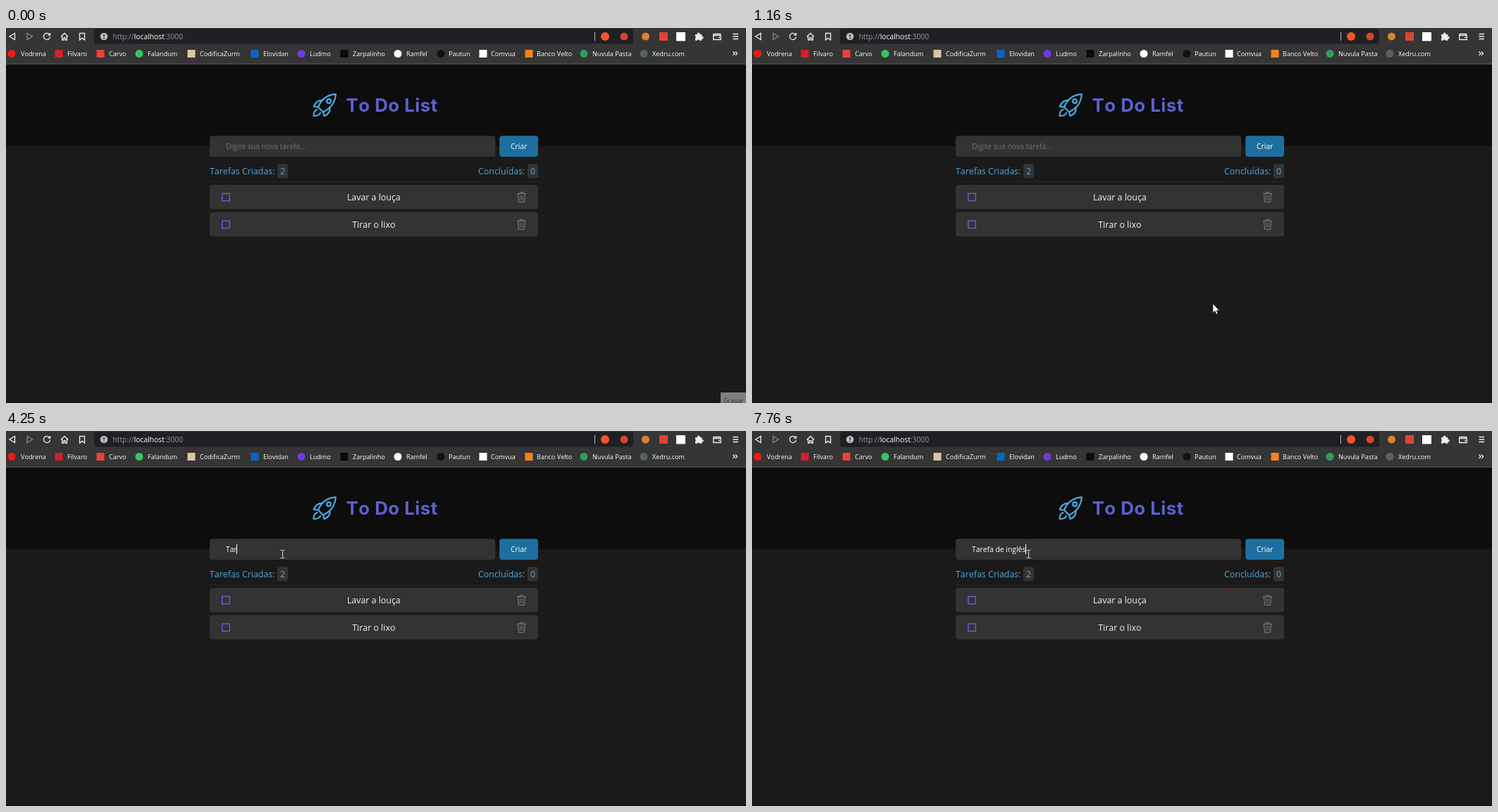
An HTML page for the animation above (8000 ms loop, 1050 px wide and 533 px high).

```html
<!DOCTYPE html>
<html lang="pt-BR">
<head>
<meta charset="utf-8">
<title>To Do List</title>
<style>
html, body { margin: 0; width: 100%; height: 100%; overflow: hidden; background: #1a1a1a; }
svg { display: block; width: 1050px; height: 533px; font-family: "Open Sans", "Noto Sans", sans-serif; }
text { white-space: pre; font-kerning: none; }
.line { fill: none; stroke: #eee; stroke-width: 1.3; }
.page { font-size: 12.4px; }
.small { font-size: 10.36px; }
.blue { fill: #4ea8de; }
.mid { text-anchor: middle; }
</style>
</head>
<body>
<svg viewBox="0 0 1050 533">
  <defs>
    <g id="task">
      <rect x="289" width="466" height="34.5" rx="4" fill="#333"/>
      <rect x="306.75" y="12.25" width="10.5" height="10.5" fill="none" stroke="#5e60ce" stroke-width="1.5"/>
      <g fill="none" stroke="#808080">
        <path d="M725 12.5h13M729 12v-1.5h5v1.5M726.6 13l.8 11.4h8.200l.8-11.400"/>
        <path d="M729.500 15v7M731.500 15v7M733.500 15v7" stroke-width=".7"/>
      </g>
    </g>
  </defs>

  <!-- Browser bars -->
  <rect width="1050" height="51" fill="#353535"/>
  <rect x="125" y="1" width="765" height="21.5" rx="3" fill="#1f2023"/>
  <g class="line">
    <path d="M12.5 7.5v9L5 12z"/>
    <path d="M30 7.5v9L37.5 12z" stroke="#888"/>
    <path d="M61.7 9.2A4.6 4.6 0 1 0 62.6 12.5M62.6 7v3.2h-3.3"/>
    <path d="M78 12.3 83 7.5l5 4.8M79.6 11.3V17h2.3v-3.4h2.2V17h2.3v-5.7"/>
    <path d="M104.5 7.500h7V17l-3.500-2.600-3.500 2.600z"/>
    <path d="M1004 8.5h9.5v2M1003.7 8.2v8.3h10.6v-6h-10M1011 13.5h2"/>
    <path d="M1031.5 8.5h7.5M1031.5 12h7.5M1031.5 15.5h7.5"/>
  </g>
  <circle cx="139" cy="12" r="5.3" fill="#bbb"/>
  <path d="M139 8.7v4M139 14v1.5" stroke="#1f2023" stroke-width="1.4"/>
  <text x="151.5" y="15.5" font-size="10.3" fill="#999">http://<tspan fill="#fff">localhost</tspan>:3000</text>
  <path d="M835.5 6v12" stroke="#bbb"/>
  <circle cx="850" cy="12" r="6" fill="#f4532d"/>
  <circle cx="877" cy="12" r="5.5" fill="#d5442c"/>
  <circle cx="907.5" cy="12" r="5.5" fill="#d9822f"/>
  <rect x="927" y="6" width="12" height="12" fill="#dd4337"/>
  <rect x="951" y="6" width="13" height="12.5" fill="#fff"/>
  <path d="M978 9h3a1.8 1.8 0 1 1 3.4 0h3v3a1.8 1.8 0 1 1 0 3.4v2.3h-3.3a1.7 1.7 0 0 0-3.2 0H978v-3a1.8 1.8 0 0 0 0-3z" fill="#eee"/>
  <g id="bookmarks" font-size="9.1" fill="#fff"></g>
  <path d="M1031.5 33.5l2.5 2.7-2.5 2.7M1035 33.5l2.5 2.7-2.5 2.7" class="line"/>

  <!-- Page -->
  <rect y="51" width="1050" height="116.5" fill="#0d0d0d"/>
  <rect y="50" width="1050" height="2" fill="#454545"/>
  <rect y="532" width="1050" height="1" fill="#0d0d0d"/>
  <g fill="none" stroke="#4ea8de" stroke-width="2.2" stroke-linejoin="round" stroke-linecap="round">
    <path d="M443 112.5C447 102 454 95 467.8 94.2C467 107.5 460 114.5 450 119.5z"/>
    <path d="M449 103C443 102.500 439 106 436.600 111.500L443 112.500M459.500 113.500C460 119 457 123 451.500 125L450 119.500"/>
    <path d="M441.500 116C437.500 117 436.500 121 436.500 125C441 125 445 124.500 446 120.500"/>
    <circle cx="458" cy="104" r="2.800"/>
  </g>
  <text x="482.5" y="119" font-family="Montserrat, Inter, sans-serif" font-size="25.8" font-weight="700" letter-spacing=".5" fill="#5e60ce">To Do List</text>

  <rect x="289" y="153.3" width="405.3" height="29.8" rx="4" fill="#333"/>
  <rect x="700.2" y="153.3" width="54.8" height="29.8" rx="4" fill="#1e6f9f"/>
  <text class="small mid" x="727.7" y="172.3" fill="#fff" font-weight="500">Criar</text>
  <text id="hint" class="small" x="312" y="172.3" fill="#707070">Digite sua nova tarefa...</text>
  <text id="typed" class="small" x="312" y="172.3" fill="#fff" xml:space="preserve"></text>
  <rect id="caret" y="161" width="1" height="14" fill="#fff"/>

  <rect x="385" y="193" width="15" height="20.5" rx="3.5" fill="#333"/>
  <rect x="740" y="193" width="15" height="20.5" rx="3.5" fill="#333"/>
  <g class="page blue">
    <text x="289" y="207.7">Tarefas Criadas:</text>
    <text x="670" y="207.7">Concluídas:</text>
    <text class="mid" x="392.5" y="207.7">2</text>
    <text class="mid" x="747.5" y="207.7">0</text>
  </g>
  <path d="M289 218.5h466" stroke="#262626"/>
  <use href="#task" y="223"/>
  <use href="#task" y="261.8"/>
  <g class="page mid" fill="#f2f2f2">
    <text x="521.8" y="244.7">Lavar a louça</text>
    <text x="521.8" y="283.5">Tirar o lixo</text>
  </g>

  <!-- Recorder buttons and pointers -->
  <g id="record">
    <rect x="1014" y="518" width="40" height="20" fill="#808080"/>
    <text x="1018" y="533" font-size="9" fill="#303030">Gravar</text>
  </g>
  <g id="stop">
    <rect x="1009" y="510" width="30" height="21" fill="#858585"/>
    <text class="mid" x="1023.8" y="524" font-size="9" fill="#303030">Parar</text>
  </g>
  <path id="arrow" d="M0 0v12.8l2.9-2.7 2 4.6 2-.9-2-4.4h4z" fill="#fff" stroke="#111" stroke-width=".5"/>
  <path id="beam" d="M-3-5.5h2.2L0-5l.8-.5H3M0-5V5M-3 5.5h2.2L0 5l.8.5H3" fill="none" stroke="#ddd"/>
</svg>
<script>
const $ = id => document.getElementById(id);
const show = (id, on) => $(id).style.display = on ? '' : 'none';

// Label, text x, icon centre, icon colour, round icon
const bookmarks = [
  ['Vodrena', 21, 8, '#f01818', 1], ['Filvaro', 87, 75, '#d81f26'], ['Carvo', 146, 134, '#ea4335'],
  ['Falandum', 201, 189, '#35c759', 1], ['CodificaZurm', 275, 263, '#d9c7a0'], ['Elovidan', 365, 353, '#0a66c2'],
  ['Ludmo', 431, 419, '#6f3be0', 1], ['Zarpalinho', 492, 480, '#0b0b0b'], ['Ramfel', 568, 556, '#fff', 1],
  ['Pautun', 628, 617, '#111', 1], ['Comvua', 688, 677, '#fff'], ['Banco Velto', 753, 742, '#f5811f'],
  ['Nuvula Pasta', 832, 820, '#2f9e5b', 1], ['Xedru.com', 917, 905, '#56655a', 1]
];
$('bookmarks').innerHTML = bookmarks.map(([label, x, icon, color, round]) =>
  `<rect x="${icon - 5.5}" y="31" width="11" height="11" rx="${round ? 5.5 : 0}" fill="${color}"/>
   <text x="${x}" y="39.5">${label}</text>`).join('');

const phrase = 'Tarefa de inglês';
const keyTimes = [3850, 4050, 4250, 4380, 4580, 4710, 4970, 5120, 5190, 5450, 5910, 6170, 6500, 7030, 7690, 7760];
const blinks = [[2660, 3190], [3720, 3850], [7560, 7690]];
const route = [[530, 1022, 519], [810, 914, 442], [1160, 654, 392], [1300, 560, 382]];

function pointer(t) {
  if (t >= 2200) return [392.5, 175];
  if (t >= 2140) return [395.5, 178];
  if (t >= 1500) {
    const p = Math.min(8, Math.floor((t - 1500) / 71) + 1) / 8;
    const e = p * p * (3 - 2 * p);
    return [560 - 167.5 * e, 382 - 206 * e];
  }
  const s = Math.min(1300, 530 + Math.floor((t - 530) / 70) * 70);
  const i = route.findIndex(k => s <= k[0]);
  if (i < 1) return route[0].slice(1);
  const [t0, x0, y0] = route[i - 1], [t1, x1, y1] = route[i];
  const p = (s - t0) / (t1 - t0);
  return [x0 + (x1 - x0) * p, y0 + (y1 - y0) * p];
}

function draw(now) {
  const t = now % 8000;
  show('record', t < 70);
  show('stop', t >= 530 && t < 1020);
  $('stop').style.opacity = 1 - Math.floor((t - 530) / 70) / 7;

  const [x, y] = pointer(t);
  const overInput = y < 183;
  show('arrow', t >= 530 && !overInput);
  show('beam', overInput);
  $(overInput ? 'beam' : 'arrow').setAttribute('transform', `translate(${x} ${y})`);

  const count = keyTimes.filter(k => t >= k).length;
  show('hint', !count);
  $('typed').textContent = phrase.slice(0, count);
  $('caret').setAttribute('x', Math.floor(312 + (count && $('typed').getComputedTextLength())));
  show('caret', t >= 2140 && !blinks.some(([from, to]) => t >= from && t < to));
  requestAnimationFrame(draw);
}
requestAnimationFrame(draw);
</script>
</body>
</html>
```
